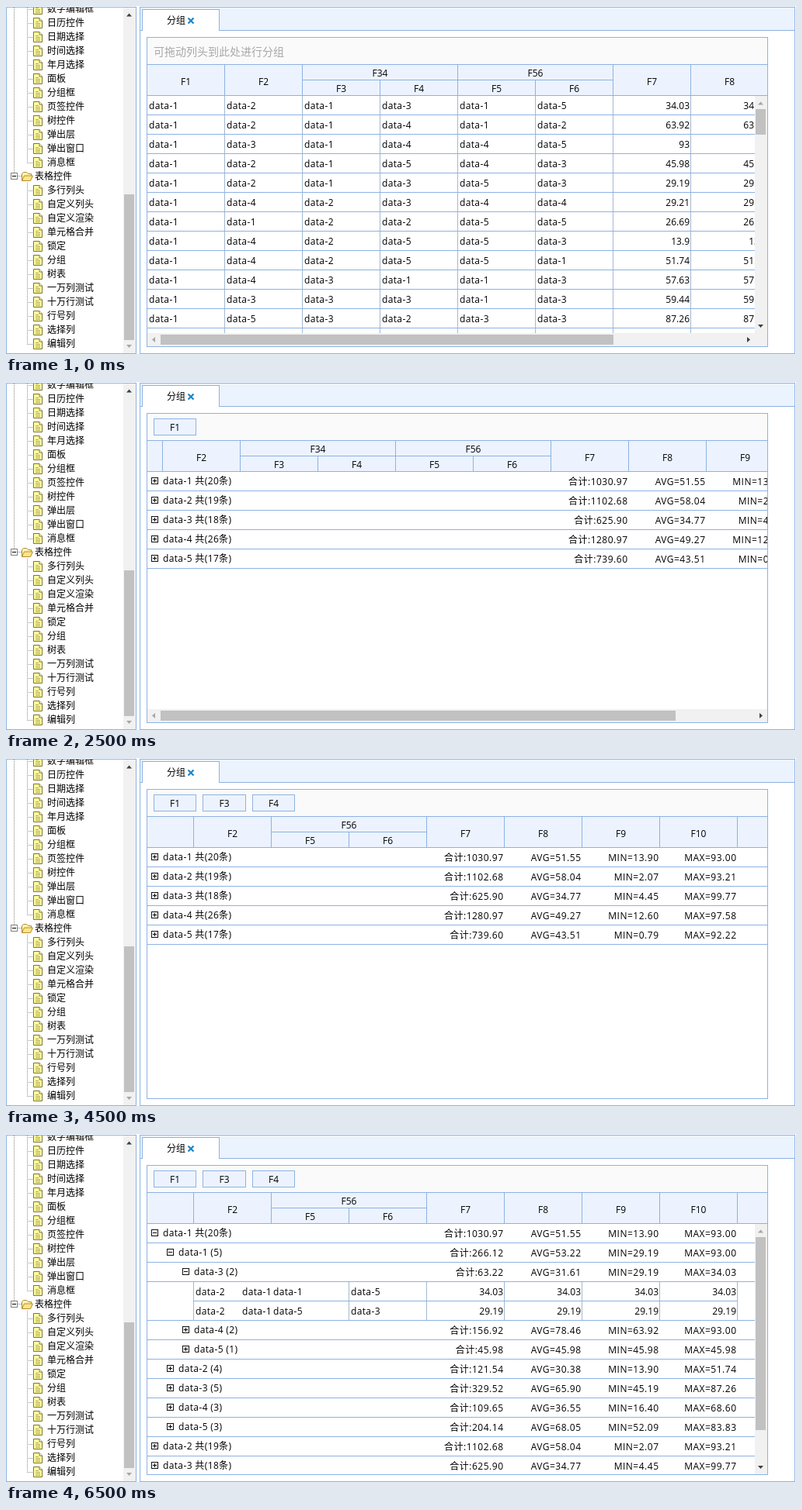
Write an HTML page that moves like this. It is 1017 by 449 pixels and loops after 8000 ms.

```html
<!DOCTYPE html>
<html lang="zh-CN">
<head>
<meta charset="utf-8">
<title>分组</title>
<style>
html, body { margin: 0; width: 100%; height: 100%; overflow: hidden; background: #fff; }
#stage { display: block; width: 1017px; height: 449px; }
rect { shape-rendering: crispEdges; }
text { font: 12px "Open Sans", "Noto Sans CJK SC", "Noto Sans CJK", sans-serif; fill: #000; }
.mid { text-anchor: middle; }
.end { text-anchor: end; }
.cell { letter-spacing: .37px; }
.stat { letter-spacing: .5px; text-anchor: end; }
.hint { font-size: 14px; fill: #a8a8a8; }

/* Each scene covers the one before it until the loop restarts. */
.scene { visibility: hidden; animation: 8s step-end infinite; }
.start { visibility: visible; }
.lift { animation-name: lift; }
.drag { animation-name: drag; }
.aim { animation-name: aim; }
.grouped { animation-name: grouped; }
.second { animation-name: second; }
.nested { animation-name: nested; }
.open1 { animation-name: open1; }
.open2 { animation-name: open2; }
.open3 { animation-name: open3; }
@keyframes lift { 12.5%, 100% { visibility: visible; } }
@keyframes drag {
  12.5% { visibility: visible; transform: translate(288px, 76px); }
  18.75% { visibility: visible; transform: translate(194px, 84px); }
  25%, 100% { visibility: visible; transform: translate(175px, 42px); }
}
@keyframes aim { 25%, 100% { visibility: visible; } }
@keyframes grouped { 31.25%, 100% { visibility: visible; } }
@keyframes second { 50%, 100% { visibility: visible; } }
@keyframes nested { 56.25%, 100% { visibility: visible; } }
@keyframes open1 { 62.5%, 100% { visibility: visible; } }
@keyframes open2 { 75%, 100% { visibility: visible; } }
@keyframes open3 { 81.25%, 100% { visibility: visible; } }
</style>
</head>
<body>
<svg id="stage" viewBox="0 0 1017 449"></svg>
<script>
const LINE = '#8db2e3', CELL = '#a3b8d2', HEAD = '#ecf3fe';

// Drawing helpers; line ends are inclusive pixels.
const rect = (x, y, w, h, fill) => `<rect x="${x}" y="${y}" width="${w}" height="${h}" fill="${fill}"/>`;
const hline = (x1, x2, y, c = LINE) => rect(x1, y, x2 - x1 + 1, 1, c);
const vline = (x, y1, y2, c = LINE) => rect(x, y1, 1, y2 - y1 + 1, c);
const box = (x, y, w, h, fill, edge = LINE) => rect(x, y, w, h, edge) + rect(x + 1, y + 1, w - 2, h - 2, fill);
const frame = (x, y, w, h) => hline(x, x + w - 1, y) + hline(x, x + w - 1, y + h - 1) +
  vline(x, y, y + h - 1) + vline(x + w - 1, y, y + h - 1);
const text = (x, mid, s, cls = '') => `<text x="${x}" y="${mid + 5}" class="${cls}">${s}</text>`;
const clip = (x, y, w, h, inner) =>
  `<svg x="${x}" y="${y}" width="${w}" height="${h}" viewBox="${x} ${y} ${w} ${h}">${inner}</svg>`;
const list = (n, fn) => Array.from({ length: n }, (_, i) => fn(i)).join('');

// Scrollbars
const arrow = (x, y, turn, on) =>
  `<path d="M-3.5 2h7L0-2z" fill="${on ? '#404040' : '#a6a6a6'}" transform="translate(${x} ${y}) rotate(${turn})"/>`;
const vbar = (x, top, bottom, from, to, upOn, downOn) =>
  rect(x, top, 16, bottom - top + 1, '#f1f1f1') + rect(x + 1, from, 13, to - from, '#c1c1c1') +
  arrow(x + 7.5, top + 9.5, 0, upOn) + arrow(x + 7.5, bottom - 8, 180, downOn);
const hbar = (right, to) =>
  rect(182, 422, 798, 17, '#f1f1f1') + rect(199, 424, to - 199, 13, '#c1c1c1') +
  arrow(190, 430.5, -90, false) + arrow(right - 8, 430.5, 90, true);

// Sidebar tree
const toggle = (x, y, open, edge = '#111') => box(x - 4, y - 4, 9, 9, '#fff', edge) +
  hline(x - 2, x + 2, y, '#000') + (open ? '' : vline(x, y - 2, y + 2, '#000'));
const dots = (x1, y1, x2, y2) =>
  `<path d="M${x1} ${y1}L${x2} ${y2}" stroke="#8a8a8a" stroke-dasharray="1 1" shape-rendering="crispEdges"/>`;
const page = y => `<g transform="translate(35 ${y - 7})">
  <path d="M.5.5h7.500l3.500 3.500v9.500h-11z" fill="#ffffa6" stroke="#7d7428"/>
  <path d="M8 .5v3.500h3.500" fill="#fff" stroke="#7d7428"/>
  <path d="M3 5.500h4M3 7.500h6M3 9.500h6M3 11.500h6" stroke="#b0a850"/></g>`;
const folder = `<path d="M20.500 225.500v-9l2-2h4l2 2h4v3" fill="#fff3b8" stroke="#b08c30"/>
  <path d="M20.500 225.500l3-6.500h11l-3 6.500z" fill="#ffe68c" stroke="#b08c30"/>`;

const tree = ('数字编辑框 日历控件 日期选择 时间选择 年月选择 面板 分组框 页签控件 树控件 弹出层 弹出窗口 消息框 ' +
  '表格控件 多行列头 自定义列头 自定义渲染 单元格合并 锁定 分组 树表 一万列测试 十万行测试 行号列 选择列 编辑列').split(' ');

function sidebar() {
  const items = tree.map((name, i) => {
    const y = 4 + 18 * i;
    if (name === '表格控件') {
      return folder + toggle(10, y - 1, true, '#848484') + dots(15, y - .5, 20, y - .5) + text(37, y - 1, name);
    }
    return dots(27, y + .5, 35, y + .5) + page(y) + text(53, y - 1, name);
  }).join('');
  const stems = dots(10.5, 2, 10.5, 215) + dots(27.5, 2, 27.5, 202) + dots(27.5, 228, 27.5, 436);
  return frame(0, 1, 168, 448) + clip(1, 2, 150, 446, stems + items) + vbar(151, 2, 447, 243, 431, true, false);
}

function tabs() {
  return rect(172, 1, 844, 31, '#ebf3fe') + frame(172, 1, 844, 448) + hline(172, 1015, 31) +
    box(175, 4, 100, 29, '#fff') + rect(175, 32, 100, 1, '#fff') + text(207, 18, '分组') +
    '<path d="M234.500 15.500l7 7m0-7l-7 7" stroke="#1787c8" stroke-width="2.200"/>';
}

// Grid parts
const F34 = ['F34', 'F3', 'F4'], F56 = ['F56', 'F5', 'F6'];

function header(indent, cols) {
  let x = 181 + indent;
  let s = rect(182, 76, 798, 39, HEAD) + hline(182, 979, 75) + hline(182, 979, 115);
  if (indent) s += vline(x, 76, 114);
  for (const col of cols) {
    if (Array.isArray(col)) {
      s += text(x + 100.5, 86, col[0], 'mid') + hline(x, x + 200, 95) + vline(x + 100, 96, 114) +
        text(x + 50.5, 106, col[1], 'mid') + text(x + 150.5, 106, col[2], 'mid');
      x += 200;
    } else {
      s += text(x + 50.5, 97, col, 'mid');
      x += 100;
    }
    s += vline(x, 76, 114);
  }
  return s;
}

const chips = names => names.map((name, i) => {
  const left = 190 + 63.5 * i, x = Math.floor(left);
  return box(x, 47, Math.floor(left + 55.5) - x, 22, HEAD) + text(left + 27.5, 58, name, 'mid');
}).join('');

const marker = x => rect(x, 46, 9, 2, '#ee8282') + rect(x, 70, 9, 2, '#ee8282') + rect(x + 3, 46, 3, 26, '#ee8282');

const scene = (name, inner) => `<g class="scene ${name}">` + rect(181, 40, 800, 400, '#fff') +
  rect(182, 41, 798, 34, '#fafafa') + clip(182, 41, 798, 398, inner) + frame(181, 40, 800, 400) + '</g>';

// Plain rows: one digit per text column, then the number.
const rows = ('121315 34.03,121412 63.92,131445 93,121543 45.98,121353 29.19,142344 29.21,' +
  '112255 26.69,142553 13.9,142551 51.74,143113 57.63,133313 59.44,153233 87.26').split(',');

function flat(skip) {
  const cells = rows.map((row, r) => {
    const [keys, num] = row.split(' '), y = 128 + 25 * r;
    return list(8, c => c < 6 - skip
      ? text(184 + 100 * c, y, 'data-' + keys[c + skip], 'cell')
      : text(280 + 100 * c, y, num, 'end'));
  }).join('');
  const grid = list(7, c => vline(281 + 100 * c, 116, 421, CELL)) + list(13, r => hline(182, 963, 140 + 25 * r));
  return clip(182, 116, 782, 306, grid + cells) + hbar(964, skip ? 847 : 782) + vbar(964, 116, 421, 133, 166, false, true);
}

// Group rows: key, count, sum, avg, min, max
const parse = (level, src) => src.split(',').map(s => {
  const [key, count, ...stats] = s.split(' ');
  return { level, label: `data-${key} ` + (level ? `(${count})` : `共(${count}条)`), stats };
});
const top5 = parse(0, '1 20 1030.97 51.55 13.90 93.00,2 19 1102.68 58.04 2.07 93.21,3 18 625.90 34.77 4.45 99.77,' +
  '4 26 1280.97 49.27 12.60 97.58,5 17 739.60 43.51 0.79 92.22');
const sub5 = parse(1, '1 5 266.12 53.22 29.19 93.00,2 4 121.54 30.38 13.90 51.74,3 5 329.52 65.90 45.19 87.26,' +
  '4 3 109.65 36.55 16.40 68.60,5 3 204.14 68.05 52.09 83.83');
const leaf3 = parse(2, '3 2 63.22 31.61 29.19 34.03,4 2 156.92 78.46 63.92 93.00,5 1 45.98 45.98 45.98 45.98');
const detail = [{ keys: '215', num: '34.03' }, { keys: '253', num: '29.19' }];

const expand = (rows, kids) => [{ ...rows[0], open: true }, ...kids, ...rows.slice(1)];
const tags = ['合计:', 'AVG=', 'MIN=', 'MAX='];

function detailRow({ keys, num }, y) {
  return text(244, y, 'data-' + keys[0], 'cell') + text(304, y, 'data-1', 'cell') +
    text(344, y, 'data-' + keys[1], 'cell') + text(444, y, 'data-' + keys[2], 'cell') +
    list(4, i => text(640 + 100 * i, y, num, 'end')) +
    [241, 441, 541, 641, 741, 841, 941].map(x => vline(x, y - 12, y + 11, CELL)).join('');
}

function groupRow({ level, label, stats, open }, y, right) {
  const shift = 20 * level;
  return toggle(191 + shift, y - 1, open) + text(202 + shift, y - 1, label, 'cell') +
    stats.map((n, c) => text(right + 100 * c, y, tags[c] + n, 'stat')).join('');
}

function groups(data, right, edge = 979) {
  const body = data.map((row, i) => {
    const y = 128 + 25 * i;
    const inner = row.keys && data[i + 1].keys;
    return (row.keys ? detailRow(row, y) : groupRow(row, y, right)) +
      (inner ? hline(241, 941, y + 12) : hline(182, edge, y + 12));
  }).join('');
  return clip(182, 116, edge - 181, 323, body);
}

const hint = text(190, 59, '可拖动列头到此处进行分组', 'hint');
const nums = ['F7', 'F8', 'F9', 'F10'];
const deep = chips(['F1', 'F3', 'F4']) + header(60, ['F2', F56, ...nums]);
const leaves = expand(leaf3, detail);

document.getElementById('stage').innerHTML = sidebar() + tabs() +
  scene('start', hint + header(0, ['F1', 'F2', F34, F56, 'F7', 'F8']) + flat(0)) +
  scene('lift', hint + header(0, ['F2', F34, F56, 'F7', 'F8', 'F9']) + flat(1)) +
  clip(182, 41, 798, 398,
    `<g class="scene drag">${box(0, 0, 100, 40, HEAD)}${text(50, 21, 'F1', 'mid')}</g>` +
    `<g class="scene aim">${marker(185)}</g>`) +
  scene('grouped', chips(['F1']) + header(20, ['F2', F34, F56, 'F7', 'F8', 'F9']) + groups(top5, 800.5) + hbar(980, 862)) +
  scene('second', chips(['F1']) + header(20, ['F2', F56, ...nums]) + groups(top5, 600.5) +
    marker(244) + box(285, 41, 200, 20, HEAD) + text(385, 52, 'F34', 'mid')) +
  scene('nested', deep + groups(top5, 640.5)) +
  scene('open1', deep + groups(expand(top5, sub5), 640.5)) +
  scene('open2', deep + groups(expand(top5, expand(sub5, leaf3)), 640.5, 963) + vbar(964, 116, 438, 133, 420, false, true)) +
  scene('open3', deep + groups(expand(top5, expand(sub5, leaves)), 640.5, 963) + vbar(964, 116, 438, 133, 382, false, true));
</script>
</body>
</html>
```
